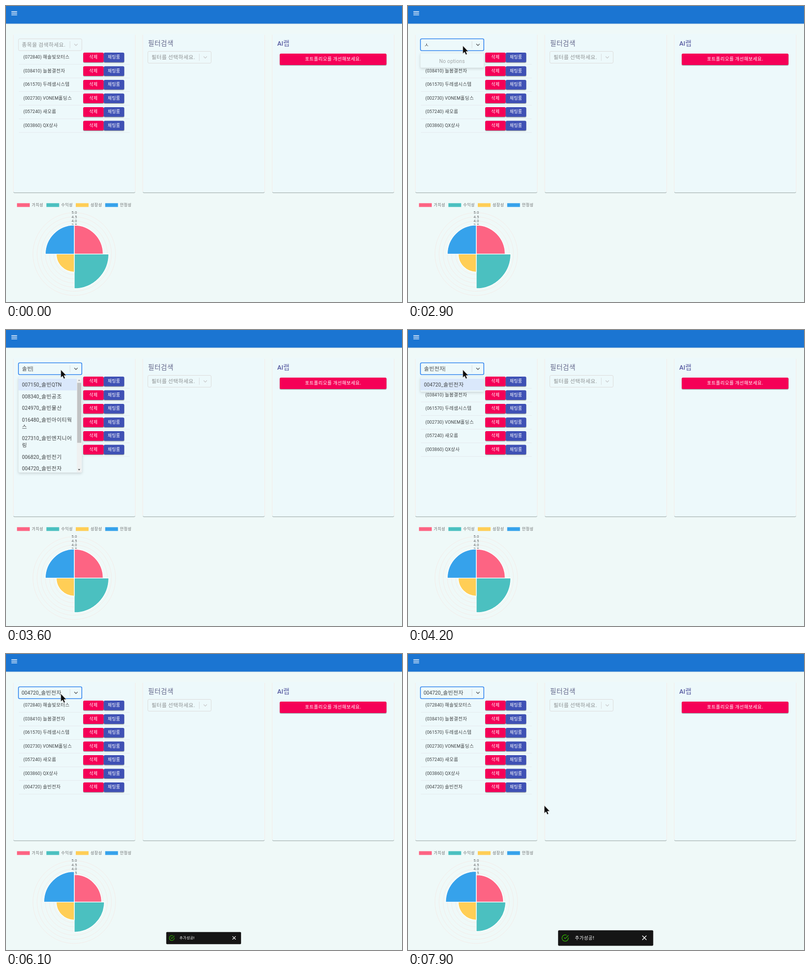
An HTML page for the animation above (8 s loop, 800 px wide and 597 px high).

```html
<!DOCTYPE html>
<html lang="ko">
<head>
<meta charset="utf-8">
<title>Portfolio dashboard</title>
<style>
  html, body { margin: 0; width: 100%; height: 100%; overflow: hidden; background: #eff9f8; }
  svg { display: block; width: 800px; height: 597px; font-family: Roboto, "Noto Sans CJK KR", "Noto Sans CJK JP", sans-serif; }
  text { white-space: pre; }
  .ko { font-size: 1.05em; letter-spacing: .04em; }
  .menu { filter: drop-shadow(0 2px 2.5px rgba(0,0,0,.14)); }
</style>
</head>
<body>
<svg viewBox="0 0 800 597">
  <clipPath id="menuClip"><rect x="25" y="95" width="128.5" height="192.5" rx="2.5"/></clipPath>
  <g id="page"></g>
  <g id="live"></g>
</svg>
<script>
const LOOP = 8000, TICK = 100;
const PAPER = '#edf9fb', RED = '#f50057', INDIGO = '#3f51b5', INK = '#404446';
const page = document.getElementById('page');
const live = document.getElementById('live');

const rect = (x, y, w, h, fill, extra = '') =>
  `<rect x="${x}" y="${y}" width="${w}" height="${h}" fill="${fill}" ${extra}/>`;
const path = (d, stroke, width = 1, extra = '') =>
  `<path d="${d}" fill="none" stroke="${stroke}" stroke-width="${width}" ${extra}/>`;
// y is the vertical middle of the line
const text = (x, y, str, size, fill, extra = '') =>
  `<text x="${x}" y="${y + size * .37}" font-size="${size}" fill="${fill}" ${extra}>` +
  str.replace(/[\u3131-\ud7a3]+/g, '<tspan class="ko">$&</tspan>') + '</text>';
const MIDDLE = 'text-anchor="middle"';

function button(x, y, w, h, fill, label, size) {
  return rect(x - .6, y + .3, w + 1.2, h + 1.5, '#000', 'rx="3" opacity=".13"') +
    rect(x, y + .6, w, h + .4, '#000', 'rx="2.5" opacity=".25"') +
    rect(x, y, w, h, fill, 'rx="2.5"') +
    text(x + w / 2, y + h / 2 - .4, label, size, '#fff', MIDDLE + ' font-weight="500" letter-spacing=".24"');
}

function card(x) {
  const right = x + 246.4;
  return rect(x, 56, 246.4, 320, PAPER, 'rx="2.5"') +
    path(`M${x} 58V374M${right} 58V374`, '#f6ebe6', .9) +
    path(`M${x + .5} 375Q${x + .8} 376.5 ${x + 2.5} 376.5H${right - 2.5}Q${right - .8} 376.5 ${right - .5} 375`, '#a9b5b5', 1.1) +
    path(`M${x + 1.5} 377.5H${right - 1.5}`, '#dde6e5', .9);
}

function selectBox(x, y, state) {
  const border = { idle: '#dcdad9', hover: '#b5b7b8', focus: '#3a8af0' }[state];
  const focused = state === 'focus';
  return rect(x, y, 128, 23.8, PAPER, `rx="2.5" stroke="${border}" stroke-width="${focused ? 1.6 : .9}"`) +
    path(`M${x + 104} ${y + 5}v14`, '#d3d6d7', .8) +
    path(`M${x + 112.8} ${y + 10.3}l3.3 3.3l3.3-3.3`, focused ? '#5a5d60' : '#c9cbcc', 1.3);
}

const STOCKS = ['(072840) 해솔빛모터스', '(038410) 늘봄결전자', '(061570) 두레샘시스템',
  '(002730) VONEM홀딩스', '(057240) 새오름', '(003860) QX상사', '(004720) 솔빈전자'];

function stockRow(label, i) {
  const y = 94 + 27.5 * i;
  return text(35, y + 9, label, 8.96, INK, 'letter-spacing=".1"') +
    button(156, y, 41.3, 19.5, RED, '삭제', 8.32) +
    button(197.5, y, 41.3, 19.5, INDIGO, '채팅룸', 8.32) +
    path(`M26 ${y + 23.6}H250`, '#e2e8ea', .8);
}

const NONE = [];
const GROUP = ['007150_솔빈QTN', '008340_솔빈공조', '024970_솔빈물산', '016480_솔빈아이티웍\n스',
  '027310_솔빈엔지니어\n링', '006820_솔빈전기', '004720_솔빈전자'];
const ALL = ['063190_3나래', '097420_AQ하임', '029740_BVN솔루', '044810_CQ누리', '018930_DX바론',
  '075260_EVO미가', '031570_FQ가론'];
const SO = ['052710_가소담', '019240_나래소재', '083460_다소니아', '046130_두루소프트', '071920_미소결',
  '035840_바로소재', '028670_소하람'];
const SOL = ['041290_두솔하임', ...GROUP];

// start, typed text, options, scrollbar thumb height
const STEPS = [
  [1800, '', ALL, 11], [2400, 'ㅅ', NONE], [3000, '소', SO, 24], [3200, '솔', SOL, 90],
  [3400, '솔ㅂ', NONE], [3500, '솔비', NONE], [3600, '솔빈', GROUP, 121],
  [3800, '솔빈ㅈ', NONE], [3900, '솔빈저', NONE],
  [4100, '솔빈전', GROUP.slice(5)], [4200, '솔빈전자', GROUP.slice(6)], [5000, null]
];

function menu(options, thumb) {
  const height = thumb ? 192.5 : 5.8 + 23.8 * Math.max(1, options.length);
  let y = 98, out = '';
  options.forEach((option, i) => {
    const lines = option.split('\n');
    const h = 10.4 + 13.4 * lines.length;
    if (!i) out += rect(25, y, 128.5, h, '#dae8fb');
    lines.forEach((line, n) => out += text(32.3, y + 12 + 13.6 * n, line, 10.24, INK));
    y += h;
  });
  if (!options.length) out = text(89, 111, 'No options', 10.24, '#a3a7a8', MIDDLE + ' letter-spacing=".2"');
  if (thumb) out += rect(143, 98, 9.7, 189, '#eff1f1') + rect(143.8, 106.5, 8.2, thumb, '#c1c3c4') +
    '<path d="M145.3 102.6l2.4-2.6l2.4 2.6z" fill="#a0a2a3"/><path d="M145.3 280.6l2.4 2.6l2.4-2.6z" fill="#505254"/>';
  return rect(25, 95, 128.5, height, PAPER, 'rx="2.5" stroke="#dfe6e8" stroke-width=".6" class="menu"') +
    `<g clip-path="url(#menuClip)">${out}</g>`;
}

// label, colour, radius before and after the new stock
const SECTORS = [['가치성', '#fd6483', 58.3, 54.9], ['수익성', '#4bc0c0', 69.7, 59.4],
  ['성장성', '#ffce56', 36.4, 36.4], ['안정성', '#36a2eb', 58.5, 61.9]];

function chartSectors(t) {
  const p = Math.min(1, Math.max(0, (t - 5700) / 1000));
  const eased = 1 - (1 - p) ** 4;
  return SECTORS.map(([, color, from, to], i) => {
    const r = from + (to - from) * eased;
    return `<path d="M0 0V${-r}A${r} ${r} 0 0 1 ${r} 0Z" fill="${color}" stroke="#fff" stroke-width="1.3"
      transform="translate(137.9 500.3) rotate(${90 * i})"/>`;
  }).join('');
}

// time, x, y of the pointer tip
const POINTER = [[900, 148, 297], [1200, 140, 215], [1500, 120, 112], [1700, 110.8, 80.3],
  [6800, 110.8, 80.3], [6900, 103, 86], [7100, 180, 104], [7300, 318, 106], [7400, 322, 140],
  [7600, 286, 270], [7700, 269, 315], [7800, 267.5, 319], [7900, 275.3, 305.6]];

function pointerAt(t) {
  const n = POINTER.findIndex(k => k[0] > t);
  if (n === 0) return null;
  if (n < 0) return POINTER[POINTER.length - 1].slice(1);
  const [t0, x0, y0] = POINTER[n - 1], [t1, x1, y1] = POINTER[n];
  const p = (t - t0) / (t1 - t0);
  return [x0 + (x1 - x0) * p, y0 + (y1 - y0) * p];
}

const over = (p, x, y) => p && p[0] >= x && p[0] <= x + 128 && p[1] >= y && p[1] <= y + 24;

// cubic-bezier(.42, 0, .58, 1)
function easeInOut(x) {
  let lo = 0, hi = 1;
  for (let i = 0; i < 24; i++) {
    const s = (lo + hi) / 2;
    if (1.26 * s * (1 - s) ** 2 + 1.74 * s * s * (1 - s) + s ** 3 < x) lo = s; else hi = s;
  }
  return lo * lo * (3 - 2 * lo);
}

const TOAST_START = 5930;

function toast(t) {
  const scale = easeInOut(Math.min(1, (t - TOAST_START) / 250));
  return `<g transform="translate(399.2 572.9) scale(${scale}) translate(-399.2 -572.9)">` +
    rect(303.2, 557.3, 192.2, 31.2, '#151515', 'rx="2"') +
    '<g transform="translate(309.8 565.2) scale(.64)">' +
    path('M22 11.1V12a10 10 0 1 1-5.93-9.14M22 4L12 14L9 11', '#31b404', 2, 'stroke-linecap="round"') + '</g>' +
    text(337.3, 572.8, '추가성공!', 8.96, '#fff', 'font-weight="500"') +
    path('M473.7 568.6l7.6 7.6M481.3 568.6l-7.6 7.6', '#fff', 1.4, 'stroke-linecap="round"') + '</g>';
}

function drawPage() {
  let out = rect(0, 35, 800, 1.4, '#bfd3e2') + rect(0, 0, 800, 35.5, '#1b75d2') +
    path('M10.9 11.5h11.5m-11.5 3.2h11.5m-11.5 3.2h11.5', '#fff', 1.3);
  for (const x of [14.8, 276.2, 537.8]) out += card(x);
  out += text(287, 75.6, '필터검색', 12.8, '#62668a') +
    text(548, 75.6, 'AI랩', 12.8, '#565aa0', 'font-weight="500"') +
    button(553, 96, 215.6, 23, RED, '포트폴리오를 개선해보세요.', 8.96);
  STOCKS.slice(0, 6).forEach((s, i) => out += stockRow(s, i));
  SECTORS.forEach(([label, color], i) => {
    const x = 22.2 + 59.4 * i;
    out += rect(x, 397.7, 25.8, 7.6, color) + text(x + 29.8, 401, label, 7.7, '#6a6d6e');
  });
  for (let i = 1; i <= 10; i++)
    out += `<circle cx="137.9" cy="500.3" r="${8.35 * i}" fill="none" stroke="#f4e9e5" stroke-width=".8"/>`;
  for (let i = 7; i <= 10; i++) {
    const y = 500 - 8.35 * i;
    out += rect(131, y - 4.5, 14, 9, '#eff9f8', 'opacity=".75"') +
      text(138, y, (i / 2).toFixed(1), 7.8, '#5f6364', MIDDLE + ' letter-spacing=".2"');
  }
  page.innerHTML = out;
}

function draw(t) {
  const pointer = pointerAt(t);
  const step = STEPS.filter(s => s[0] <= t).pop();
  const [since, typed, options, thumb] = step || [];
  const typing = step && typed !== null;
  const picked = step && !typing;
  const state = step ? 'focus' : over(pointer, 25, 66) ? 'hover' : 'idle';

  let out = selectBox(25.2, 66.2, state) +
    selectBox(286.5, 91.5, over(pointer, 286, 91) ? 'hover' : 'idle') +
    text(294, 103.4, '필터를 선택하세요.', 10.24, '#8d9192');
  if (t >= 5700) out += stockRow(STOCKS[6], 6);
  if (typing) out += menu(options, thumb);
  if (picked) out += text(31.6, 78.4, GROUP[6], 10.24, INK);
  else if (typed) out += text(32.6, 78.4, typed, 10.24, INK, 'id="typed"');
  else out += text(32, 78.4, '종목을 검색하세요.', 10.24, '#8d9192');
  out += chartSectors(t);
  if (t > TOAST_START) out += toast(t);
  if (typing && (t - since) % 1000 < 500) out += path('M0 73.4v10.4', INK, .8, 'id="caret"');
  if (pointer) out += `<path transform="translate(${pointer})" d="M0 0V15.6L3.5 12.4L6 18L8.6 16.9L6.2 11.4H11Z"
    fill="#0b0b0b" stroke="#fff" stroke-width=".5"/>`;
  live.innerHTML = out;

  const caret = document.getElementById('caret');
  const input = document.getElementById('typed');
  if (caret) caret.setAttribute('transform', `translate(${33 + (input ? input.getComputedTextLength() : 0)} 0)`);
}

let last = -1;
const start = performance.now();
function frame() {
  const t = Math.floor((performance.now() - start) % LOOP / TICK) * TICK;
  if (t !== last) draw(last = t);
  requestAnimationFrame(frame);
}
drawPage();
frame();
</script>
</body>
</html>
```
